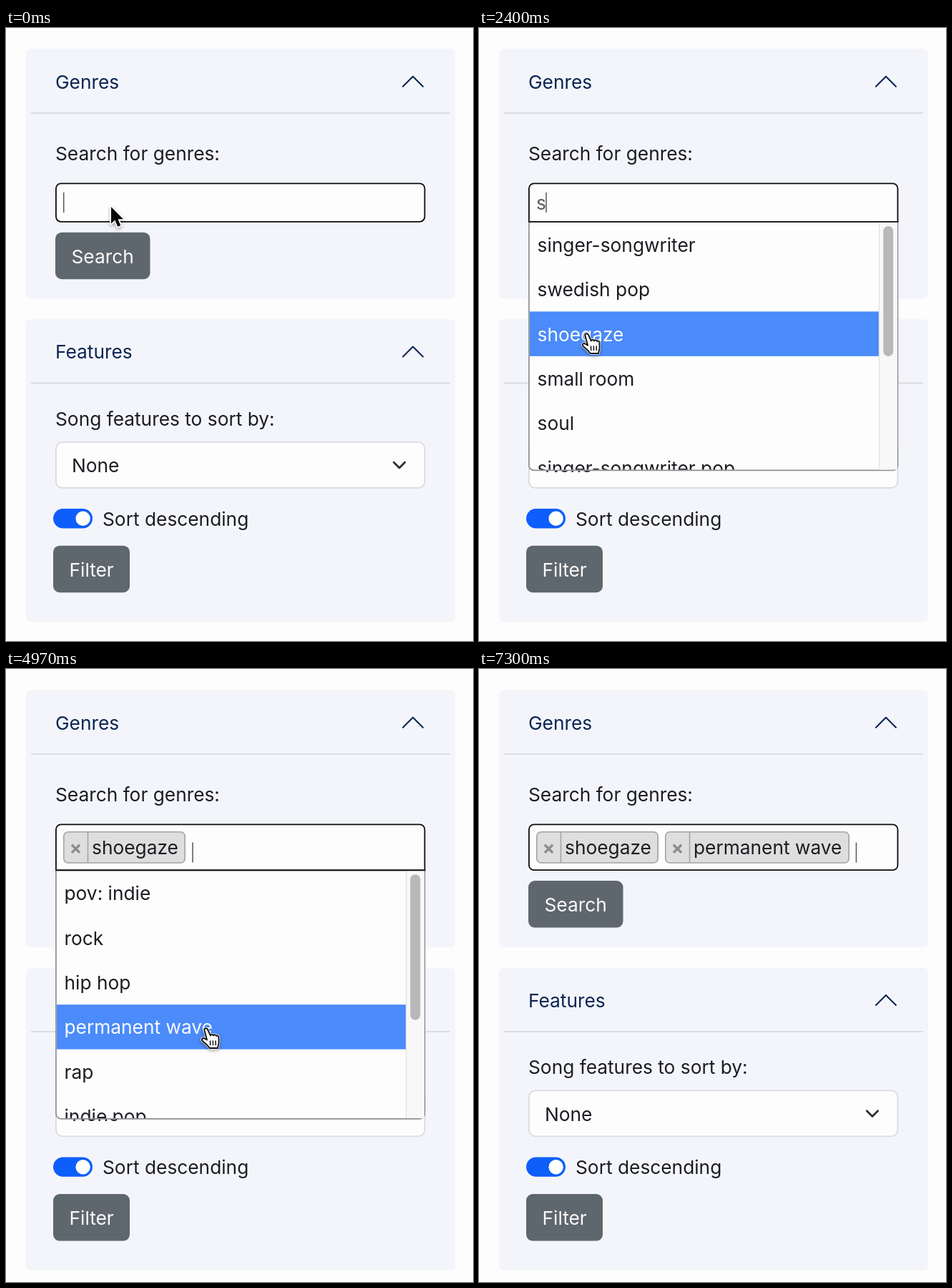
Animation of 653x857 px, one loop 7330 ms. Source, as an HTML page with a canvas:

```html
<!DOCTYPE html>
<html lang="en">
<head>
<meta charset="utf-8">
<title>Genre picker</title>
<style>
  html, body { margin: 0; width: 100%; height: 100%; overflow: hidden; background: #fdfdfd; }
  canvas { display: block; width: 653px; height: 857px; }
</style>
</head>
<body>
<canvas id="stage"></canvas>
<script>
const W = 653, H = 857, LOOP = 7330, ROW = 62.4;
const canvas = document.getElementById('stage');
const ctx = canvas.getContext('2d');
const dpr = window.devicePixelRatio || 1;
canvas.width = W * dpr;
canvas.height = H * dpr;

const INK = '#1c1d22', NAVY = '#0a2553', PANEL = '#f4f5fa', RULE = '#d9dbe1',
      PAPER = '#fdfdfd', GREY = '#5f676e', BLUE = '#4b8bfa';

const POPULAR = ['pov: indie', 'rock', 'hip hop', 'permanent wave', 'rap', 'indie pop'];
const MATCHES = ['singer-songwriter', 'swedish pop', 'shoegaze', 'small room', 'soul', 'singer-songwriter pop'];
const WAIT = 'Searching...';

// Moments of the interaction, in ms
const AT = {
  open1: 650, list1: 800, type: 930, results: 1450, move: 1650, pick1: 2500,
  open2: 3620, list2: 3820, pick2: 5170, hide: 6300
};

// Pointer path: time, x, y
const PATH = [
  [0, 147, 250], [1650, 147, 250], [1930, 147, 345], [2080, 148, 362],
  [2330, 150, 428], [2650, 150, 428], [3120, 272, 254], [3250, 272, 254],
  [3450, 279, 242], [4450, 279, 242], [4950, 279, 503], [5200, 279, 503],
  [5590, 277, 303], [7330, 277, 303]
];

function pointerAt(t) {
  let i = 0;
  while (i < PATH.length - 2 && PATH[i + 1][0] <= t) i++;
  const [t0, x0, y0] = PATH[i], [t1, x1, y1] = PATH[i + 1];
  const p = (t - t0) / (t1 - t0), e = p * p * (3 - 2 * p);
  return { x: x0 + (x1 - x0) * e, y: y0 + (y1 - y0) * e };
}

function text(str, x, y, color = INK) {
  ctx.font = '26.3px Inter, "Open Sans", sans-serif';
  ctx.fillStyle = color;
  ctx.fillText(str, x, y);
}

function box(x, y, w, h, r, fill, stroke, line = 1.8) {
  ctx.beginPath();
  ctx.roundRect(x, y, w, h, r);
  if (fill) { ctx.fillStyle = fill; ctx.fill(); }
  if (stroke) { ctx.strokeStyle = stroke; ctx.lineWidth = line; ctx.stroke(); }
}

function line(points, color, width, cap = 'butt') {
  ctx.beginPath();
  points.forEach(([x, y]) => ctx.lineTo(x, y));
  ctx.strokeStyle = color;
  ctx.lineWidth = width;
  ctx.lineCap = cap;
  ctx.lineJoin = cap === 'round' ? 'round' : 'miter';
  ctx.stroke();
}

function panel(title, y, h) {
  box(28, y, 600, h, 7, PANEL);
  text(title, 69, y + 55.3, NAVY);
  line([[555, y + 52.5], [569, y + 38.5], [583, y + 52.5]], NAVY, 2.1, 'round');
  line([[35, y + 89.5], [621, y + 89.5]], RULE, 1.8);
}

function button(label, x, y, w) {
  box(x, y, w, 65.5, 9, GREY);
  text(label, x + 22.5, y + 43, '#fbfbfb');
}

function tag(label, x, w) {
  box(x + 0.8, 227.8, w - 1.6, 43.2, 6, '#dedede', '#a3a3a3', 1.6);
  line([[x + 34.5, 228], [x + 34.5, 271]], '#a3a3a3', 1.6);
  const cx = x + 17.5, cy = 251.3, d = 5.6;
  line([[cx - d, cy - d], [cx + d, cy + d]], '#8c8c8c', 3.4);
  line([[cx - d, cy + d], [cx + d, cy - d]], '#8c8c8c', 3.4);
  text(label, x + 40, 259.3);
}

function page(shift) {
  ctx.fillStyle = PAPER;
  ctx.fillRect(0, 0, W, H);
  panel('Genres', 29.3, 349.5 + shift);
  text('Search for genres:', 69, 185);
  button('Search', 69, 285.7 + shift, 132.5);

  ctx.save();
  ctx.translate(0, shift);
  panel('Features', 407, 423.7);
  text('Song features to sort by:', 69, 555.7);
  box(69.9, 578.9, 515.6, 64, 9, PAPER, RULE);
  text('None', 92, 621.3);
  line([[542.3, 607.3], [550, 615], [557.7, 607.3]], '#2b2e35', 2.8, 'round');
  box(66, 672, 55, 27.4, 13.7, '#0d5efb');
  box(97.4, 675.6, 20.4, 20.4, 10.2, '#fff');
  text('Sort descending', 135, 696);
  button('Filter', 66, 723.7, 107);
  ctx.restore();
}

function field(state) {
  const open = state.rows.length > 0;
  const h = 53.4 + state.shift;
  box(69.9, 217.4, 515.6, h, open ? [7, 7, 0, 0] : 7, PAPER, '#0c0c0e');
  if (state.typed) text('s', 80, 253.5, '#5c5c5c');
  if (state.tags > 0) tag('shoegaze', 80, 171);
  if (state.tags > 1) tag('permanent wave', 260, 258);
  if (state.caret) {
    const x = state.tags > 1 ? 527.5 : state.tags ? 261 : state.typed ? 94 : 80.7;
    const y = state.tags ? 242.5 : 230;
    line([[x, y], [x, y + 28]], '#555', 1.5);
  }
}

function dropdown(state) {
  const { rows, top, active } = state;
  const full = rows.length > 1;
  const h = full ? 347.5 : ROW + 1;
  box(69.9, top, 515.6, h, [0, 0, 7, 7], PAPER, '#8f8f92', 1.7);
  ctx.save();
  ctx.beginPath();
  ctx.rect(70.8, top, 514, h - 0.8);
  ctx.clip();
  rows.forEach((label, i) => {
    const y = top + 0.7 + i * ROW;
    if (i === active) {
      ctx.fillStyle = BLUE;
      ctx.fillRect(70.8, y, 488.2, ROW);
    }
    text(label, 81.5, y + 41.2, i === active ? '#fbfbfb' : label === WAIT ? '#8c8c8c' : INK);
  });
  if (full) {
    ctx.fillStyle = '#f8f8f8';
    ctx.fillRect(559, top, 26, h);
    line([[559.6, top], [559.6, top + h]], '#e4e4e4', 1.4);
    box(565.3, top + 6, 14, state.tags ? 203.5 : 182, 7, '#b8b8b8');
  }
  ctx.restore();
  line([[69, top], [586.4, top]], '#0c0c0e', 1.8);
}

const ARROW = new Path2D('M0 0V23.5L5.3 18.6 9.2 27.8 13.3 26 9.5 17.2H17Z');
const HAND = new Path2D('M-1.6 2C-2.4-.4 1.4-2 2.8.7L6.8 9.4C7.6 7.5 10.4 7.5 11 9.4 12 7.8 14.5 8 15 9.9 16.4 9 18.2 9.8 18.4 11.8L18.6 19C18.6 22 17.2 23.6 17 27H5.5C4 23.7-.4 20.7-4.3 17-6.8 14.6-4 12-1.2 13.7L2 15.5Z');
const BEAM = new Path2D('M-6-13H-4Q0-13 0-9V9Q0 13-4 13H-6M6-13H4Q0-13 0-9M0 9Q0 13 4 13H6M-3 2H3');

function pointer({ x, y }, kind) {
  ctx.save();
  ctx.translate(x, y);
  ctx.lineCap = ctx.lineJoin = 'round';
  if (kind === 'beam') {
    ctx.strokeStyle = '#fff';
    ctx.lineWidth = 4;
    ctx.stroke(BEAM);
    ctx.strokeStyle = '#111';
    ctx.lineWidth = 2;
    ctx.stroke(BEAM);
  } else {
    const hand = kind === 'hand', shape = hand ? HAND : ARROW;
    ctx.save();
    ctx.shadowColor = 'rgba(0,0,0,.35)';
    ctx.shadowBlur = 4 * dpr;
    ctx.shadowOffsetY = 2 * dpr;
    ctx.strokeStyle = '#fff';
    ctx.lineWidth = 3.4;
    ctx.stroke(shape);
    ctx.restore();
    ctx.fillStyle = hand ? '#fff' : '#050505';
    ctx.fill(shape);
    if (hand) {
      ctx.strokeStyle = '#111';
      ctx.lineWidth = 1.9;
      ctx.stroke(shape);
      for (const i of [0, 1, 2]) line([[6.5 + i * 3.8, 17], [6.7 + i * 3.8, 22.5]], '#111', 1.5, 'round');
    }
  }
  ctx.restore();
}

function rowsAt(t) {
  if (t < AT.open1) return [];
  if (t < AT.list1) return [WAIT];
  if (t < AT.type) return POPULAR;
  if (t < AT.results) return [WAIT, ...POPULAR];
  if (t < AT.pick1) return MATCHES;
  if (t < AT.open2) return [];
  if (t < AT.list2) return [WAIT];
  return t < AT.pick2 ? POPULAR : [];
}

// The caret restarts its blink after every action
function caretOn(t) {
  const start = [AT.pick2, AT.open2, AT.pick1, AT.type, AT.open1, 0].find(s => t >= s);
  return (t - start) % 1000 < 500;
}

function draw(t) {
  const pos = pointerAt(t), rows = rowsAt(t);
  const tags = (t >= AT.pick1) + (t >= AT.pick2);
  const shift = tags ? 10.4 : 0, top = 270.9 + shift;
  const over = rows.length > 0 && pos.y > top;
  let active = rows[0] === WAIT ? 1 : 0;
  if (over) active = Math.floor((pos.y - top) / ROW);
  const state = {
    rows, tags, shift, top, active, caret: caretOn(t),
    typed: t >= AT.type && t < AT.pick1
  };

  ctx.setTransform(dpr, 0, 0, dpr, 0, 0);
  page(shift);
  field(state);
  if (rows.length) dropdown(state);

  const hidden = (t >= AT.type && t < AT.move) || t >= AT.hide;
  const inField = tags > 0 && pos.x > 255 && pos.y > 217 && pos.y < top;
  if (!hidden) pointer(pos, over ? 'hand' : inField ? 'beam' : 'arrow');
}

let begin;
function tick(now) {
  begin ??= now;
  draw((now - begin) % LOOP);
  requestAnimationFrame(tick);
}
draw(0);
requestAnimationFrame(tick);
</script>
</body>
</html>
```
